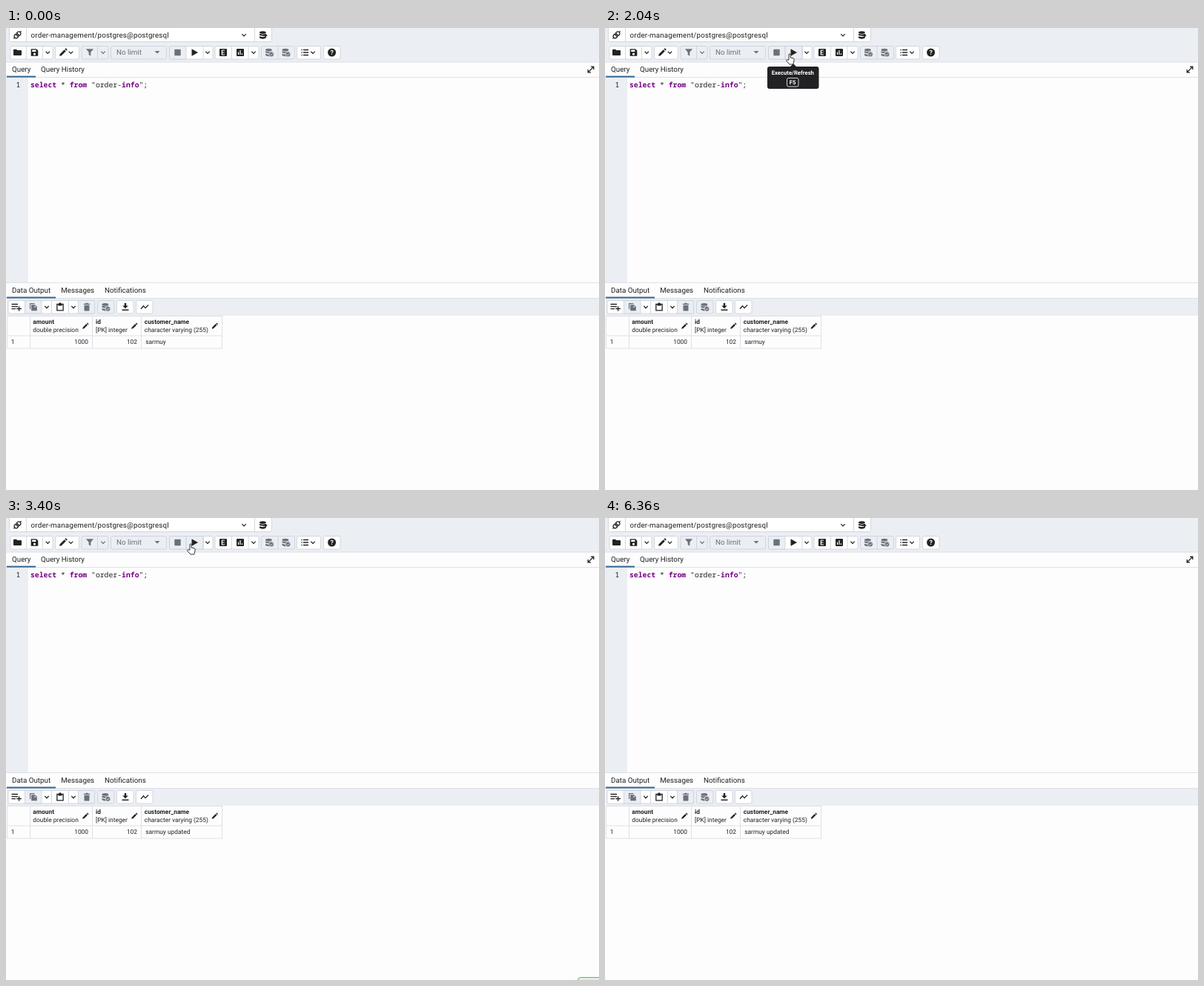
Animation, 800 px wide and 623 px high, one loop 7.2 s. Source, as an HTML page:

```html
<!DOCTYPE html>
<html lang="en">
<head>
<meta charset="utf-8">
<title>Query tool</title>
<style>
  html, body { margin: 0; width: 100%; height: 100%; overflow: hidden; background: #fefdfe; }
  svg { display: block; width: 800px; height: 623px; }
  text { font: 9.8px Roboto, "Open Sans", sans-serif; fill: #222; text-rendering: geometricPrecision; white-space: pre; }
  .small, .small text { font-size: 8.4px; }
  .bold { font-weight: 700; }
  .end { text-anchor: middle; text-anchor: end; }
  .code { font: 9.77px "Noto Sans Mono", "DejaVu Sans Mono", monospace; }
  .key { fill: #770088; font-weight: 700; }
  .tip text { font-size: 7.7px; font-weight: 600; fill: #fff; }
  .wait { font-size: 11.05px; font-weight: 500; fill: #fff; }
  .bar { fill: #ebeef3; }
  .line { fill: #dde0e6; }
  .active { fill: #326690; }
  .box { fill: #fff; stroke: #c9cfd9; stroke-width: .8; }
  .off { fill: #ebeef3; }
  .grid { fill: none; stroke: #dde0e6; }
  .ico { fill: #222; color: #222; }
  .dim, .dim use { fill: #6c7079; color: #6c7079; }
  .stroke { fill: none; stroke: currentColor; stroke-width: 1.3; }
  .pointer path { fill: #fff; stroke: #111; stroke-width: .85; stroke-linejoin: round; }
  .pointer .beam { fill: none; stroke-width: 1; }

  .pointer { animation: travel 7.2s linear infinite; }
  .arrow, .hand, .beam, .hover, .busy, .toast, .before, .after { opacity: 0; animation: 7.2s step-end infinite; }
  .arrow { animation-name: arrow; }
  .hand { animation-name: hand; }
  .beam { animation-name: beam; }
  .hover { animation-name: hover; }
  .busy { animation-name: busy; }
  .toast { animation-name: toast; }
  .before { animation-name: before; }
  .after { animation-name: after; }
  .tip { opacity: 0; animation: tip 7.2s linear infinite; }

  @keyframes travel {
    0%, .55% { transform: translate(309px, 608px); }
    3.33% { transform: translate(304px, 500px); }
    6.11% { transform: translate(278px, 230px); }
    8.33% { transform: translate(254px, 80px); }
    10.55%, 55% { transform: translate(248px, 35px); }
    57.22% { transform: translate(245px, 90px); }
    59.44% { transform: translate(228px, 300px); }
    61.11% { transform: translate(216px, 420px); }
    62.22%, 64.44% { transform: translate(213px, 439px); }
    65% { transform: translate(213px, 439px); }
    67.77%, 69.44% { transform: translate(247px, 420px); }
    71.66%, 75.55% { transform: translate(227px, 420.5px); }
    78.3% { transform: translate(243px, 490px); }
    81.11%, 100% { transform: translate(258px, 624px); }
  }
  @keyframes arrow {
    0% { opacity: 0; }
    .55% { opacity: 1; }
    4.94% { opacity: 0; }
    8.97% { opacity: 1; }
    10.2% { opacity: 0; }
    44.99% { opacity: 1; }
    47.21% { opacity: 0; }
    55.9% { opacity: 1; }
    56.5% { opacity: 0; }
    60.04% { opacity: 1; }
    81.1%, 100% { opacity: 0; }
  }
  @keyframes hand {
    0% { opacity: 0; }
    10.2% { opacity: 1; }
    44.99% { opacity: 0; }
    47.21% { opacity: 1; }
    55.9%, 100% { opacity: 0; }
  }
  @keyframes beam {
    0% { opacity: 0; }
    4.94% { opacity: 1; }
    8.97% { opacity: 0; }
    56.5% { opacity: 1; }
    60.04%, 100% { opacity: 0; }
  }
  @keyframes hover {
    0% { opacity: 0; }
    10.2% { opacity: 1; }
    55.9%, 100% { opacity: 0; }
  }
  @keyframes tip {
    0%, 16.66% { opacity: 0; }
    18.88%, 45.54% { opacity: 1; }
    45.55%, 100% { opacity: 0; }
  }
  @keyframes busy {
    0% { opacity: 0; }
    45.55% { opacity: 1; }
    47.21%, 100% { opacity: 0; }
  }
  @keyframes before { 0% { opacity: 1; } 47.21%, 100% { opacity: 0; } }
  @keyframes after { 0% { opacity: 0; } 47.21%, 100% { opacity: 1; } }
  @keyframes toast { 0% { opacity: 0; } 47.21% { opacity: 1; } 88.33%, 100% { opacity: 0; } }
</style>
</head>
<body>
<svg viewBox="0 0 800 623">
  <defs>
    <path id="caret" class="stroke" d="M-2.7-1.4L0 1.4 2.7-1.4"/>
    <path id="folder" d="M-5.5-3.2q0-1 1-1h3l1.3 1.3h4.7q1 0 1 1v5q0 1-1 1h-9q-1 0-1-1z"/>
    <path id="save" fill-rule="evenodd" d="M-4.8-4.8h7.4l2.2 2.2v7.4h-9.6zM-3.3-3.4h5.2v2.4h-5.2zM0 .6a1.6 1.6 0 1 0 .01 0z"/>
    <path id="pencil" d="M-4.8 4.8l.5-2.6L1.7-3.8 3.8-1.7-2.2 4.3zM2.4-4.5l.9-.9q.5-.4 1 0l1.1 1.1q.4.5 0 1l-.9.9z"/>
    <path id="filter" d="M-5-4.8h10L1.3-.2v5L-1.3 3v-3.2z"/>
    <path id="stop" d="M-4.2-3.4q0-.8.8-.8h6.8q.8 0 .8.8v6.8q0 .8-.8.8h-6.8q-.8 0-.8-.8z"/>
    <path id="play" d="M-4-4.8L4.6 0-4 4.8z"/>
    <g id="explain">
      <rect x="-5" y="-5" width="10" height="10" rx="1"/>
      <path d="M2-3h-3.6v6H2M-1.6 0H1.6" fill="none" stroke="#fff" stroke-width="1.2"/>
    </g>
    <g id="chart">
      <rect x="-5" y="-5" width="10" height="10" rx="1"/>
      <path d="M-2.5 3v-3.5M0 3v-6M2.5 3v-1.8" stroke="#fff" stroke-width="1.2"/>
    </g>
    <g id="db">
      <ellipse cx="-.6" cy="-3.4" rx="4.4" ry="1.8"/>
      <path d="M-5-2c1.5 1.5 7.3 1.5 8.8 0v2.1c-1.5 1.5-7.3 1.5-8.8 0zM-5 1.4c1.5 1.5 7.3 1.5 8.8 0v2.4c-1.5 1.8-7.3 1.8-8.8 0z"/>
    </g>
    <g id="dbmark">
      <use href="#db"/>
      <circle cx="3" cy="2.5" r="3.4" stroke="#ebeef3" stroke-width=".8"/>
      <path d="M1.5 2.5l1.1 1.2 2-2.2" fill="none" stroke="#ebeef3" stroke-width=".9"/>
    </g>
    <path id="list" class="stroke" d="M-2.5-3.5h7M-2.5 0h7M-2.5 3.5h7M-5-3.5h1.3M-5 0h1.3M-5 3.5h1.3"/>
    <path id="copy" fill-rule="evenodd" d="M-5-5h6.5v1.2h-5.3v6.8h-1.2zM-2.8-2.8h4.8l2.8 2.6v5.4h-7.6zM1.3-1.8v2.4h2.5z"/>
    <path id="paste" fill-rule="evenodd" d="M-4.8-4.2h3q.2-1.5 1.8-1.5t1.8 1.5h3v9.7h-9.6zM-3.5-2.8v7h7v-7h-1v1.4h-5v-1.4z"/>
    <path id="trash" d="M-4.2-4.6h2.4l.6-.9h2.4l.6.9h2.4v1.3h-8.4zM-3.5-2.5h7v6.6q0 1.2-1.2 1.2h-4.6q-1.2 0-1.2-1.2z"/>
    <path id="download" d="M-1.2-5h2.4v3.5h2.6L0 2.3-3.8-1.5h2.6zM-4.5 3.5h9v1.4h-9z"/>
    <path id="trend" class="stroke" d="M-5 2.5l3.5-4 2.6 2.8L5-2.8"/>
    <path id="addrow" class="stroke" d="M-6.5-3.5h8.5M-6.5-.4h8.5M-6.5 2.7h5.5M3.6-.8v6.6M.3 2.5h6.6"/>
  </defs>

  <rect width="800" height="623" fill="#fefdfe"/>

  <!-- connection bar and toolbar -->
  <rect class="bar" width="800" height="46"/>
  <rect class="line" y="45.5" width="800" height="1"/>
  <g class="box">
    <path d="M4.5-1H358.5V16.5q0 2-2 2H6.5q-2 0-2-2zM27.5-1V18.5M335.5-1V18.5"/>
    <path d="M8 24.5H61q2 0 2 2V40q0 2-2 2H8q-2 0-2-2V26.5q0-2 2-2zM27.5 24.5V42M49.5 24.5V42"/>
    <rect x="66.5" y="24.5" width="32" height="17.5" rx="2"/>
    <rect class="off" x="102" y="24.5" width="36" height="17.5" rx="2"/>
    <path d="M123.5 24.5V42"/>
    <rect class="off" x="141.5" y="24.5" width="75" height="17.5" rx="2"/>
    <rect x="220.5" y="24.5" width="58.5" height="17.5" rx="2"/>
    <rect class="off" x="220.5" y="24.5" width="22.5" height="17.5" rx="2"/>
    <path class="hover off" d="M243 24.5H266V42H243z"/>
    <path d="M266 24.5V42" />
    <rect x="282" y="24.5" width="59" height="17.5" rx="2"/>
    <path d="M304.5 24.5V42M327 24.5V42"/>
    <rect class="off" x="344.5" y="24.5" width="45" height="17.5" rx="2"/>
    <path d="M367 24.5V42"/>
    <rect x="392.5" y="24.5" width="32" height="17.5" rx="2"/>
    <rect x="428.5" y="24.5" width="22.5" height="17.5" rx="2"/>
  </g>
  <g class="ico">
    <g transform="translate(15.5 9.3) rotate(-45)" class="stroke">
      <path d="M-1-2.6h-1.6a2.6 2.6 0 0 0 0 5.2H-1zM1-2.6h1.6a2.6 2.6 0 0 1 0 5.2H1zM-5.2 0h-2M5.2 0h2M-1-1.2h2M-1 1.2h2"/>
    </g>
    <use href="#caret" x="321" y="9.5"/>
    <use href="#db" x="347" y="9.5"/>
    <path d="M347 10h4.5M349.5 8l2.2 2-2.2 2" class="stroke"/>
    <use href="#folder" x="15.5" y="33"/>
    <use href="#save" x="38.5" y="33"/>
    <use href="#caret" x="56.3" y="33"/>
    <use href="#pencil" x="77" y="33"/>
    <use href="#caret" x="87.5" y="33"/>
    <use href="#play" x="254.5" y="33"/>
    <use href="#caret" x="272" y="33"/>
    <use href="#explain" x="293" y="33"/>
    <use href="#chart" x="316" y="33"/>
    <use href="#caret" x="334" y="33"/>
    <use href="#list" x="403.5" y="33"/>
    <use href="#caret" x="414" y="33"/>
    <circle cx="439.6" cy="33" r="5.5"/>
  </g>
  <text x="437.4" y="36.2" style="font-size:8.8px;font-weight:700;fill:#fff">?</text>
  <g class="dim">
    <use href="#filter" x="113" y="33"/>
    <use href="#caret" x="131" y="33"/>
    <path d="M200.5 31h7l-3.5 3.6z"/>
    <use href="#stop" x="231.5" y="33"/>
    <use href="#dbmark" x="355" y="33"/>
    <use href="#dbmark" x="377.5" y="33"/>
  </g>
  <text x="33.6" y="12.8" letter-spacing=".15">order-management/postgres@postgresql</text>
  <text x="149" y="36.3" style="fill:#6c7079">No limit</text>

  <!-- query editor -->
  <rect class="line" y="66" width="800" height="1"/>
  <rect class="active" x="1" y="64.6" width="39" height="2"/>
  <text x="8" y="58.8">Query</text>
  <text x="47" y="58.8">Query History</text>
  <path d="M785.5 59.5l7-7M789 52.2h3.8V56M785.2 56v3.8h3.8" class="stroke" color="#222"/>
  <rect class="bar" y="67" width="30" height="276"/>
  <text class="code" x="13.5" y="80">1</text>
  <text class="code" x="33" y="80"><tspan class="key">select</tspan> * <tspan class="key">from</tspan> "order-<tspan class="key">info</tspan>";</text>

  <!-- output panel -->
  <rect class="line" y="343" width="800" height="1"/>
  <rect class="line" y="364" width="800" height="1"/>
  <rect class="active" x="1" y="362.5" width="66" height="2"/>
  <text x="8" y="356.8">Data Output</text>
  <text x="74.2" y="356.8">Messages</text>
  <text x="133" y="356.8">Notifications</text>
  <rect class="bar" x="1" y="365" width="799" height="23"/>
  <g class="box">
    <rect x="3" y="367.5" width="116.5" height="17.5" rx="2"/>
    <path class="off" d="M25.5 367.5H48V385H25.5zM97.5 367.5H119.5V385H97.5z"/>
    <path d="M61.5 367.5V385M84.5 367.5V385"/>
    <rect class="off" x="123.5" y="367.5" width="22.5" height="17.5" rx="2"/>
    <rect x="149.5" y="367.5" width="22.5" height="17.5" rx="2"/>
    <rect x="175.5" y="367.5" width="22.5" height="17.5" rx="2"/>
  </g>
  <g class="ico">
    <use href="#addrow" x="14" y="376"/>
    <use href="#caret" x="55" y="376.3"/>
    <use href="#paste" x="73" y="376"/>
    <use href="#caret" x="91" y="376.3"/>
    <use href="#download" x="161" y="376"/>
    <use href="#trend" x="187" y="376.3"/>
  </g>
  <g class="dim">
    <use href="#copy" x="37" y="376"/>
    <use href="#trash" x="109" y="376.3"/>
    <use href="#dbmark" x="134.5" y="376.3"/>
  </g>
  <path class="grid" d="M1.5 388V432.5M32.5 388V432.5M116.5 388V432.5M182.5 388V432.5M291.5 388V432.5M1 388.5H292M1 415H292M1 432H292"/>
  <g class="small">
    <text class="bold" x="36.3" y="399">amount</text>
    <text x="36.3" y="409.7">double precision</text>
    <text class="bold" x="121" y="399">id</text>
    <text x="121" y="409.7">[PK] integer</text>
    <text class="bold" x="186.8" y="399">customer_name</text>
    <text x="186.8" y="409.7">character varying (255)</text>
    <text x="6.8" y="426.3">1</text>
    <text class="end" x="111" y="426.3">1000</text>
    <text class="end" x="177" y="426.3">102</text>
    <text class="before" x="188.2" y="426.3">sarmuy</text>
    <text class="after" x="188.2" y="426.3">sarmuy updated</text>
  </g>
  <g class="ico">
    <use href="#pencil" transform="translate(107 402) scale(.78)"/>
    <use href="#pencil" transform="translate(173 402) scale(.78)"/>
    <use href="#pencil" transform="translate(281.5 402) scale(.78)"/>
  </g>

  <!-- running state -->
  <g class="busy">
    <g class="box">
      <rect x="220.5" y="24.5" width="22.5" height="17.5" rx="2"/>
      <path class="off" d="M243 24.5H266V42H243z"/>
      <path class="off" d="M284 24.5H327V42H284q-2 0-2-2V26.5q0-2 2-2zM304.5 24.5V42"/>
    </g>
    <use class="ico" href="#stop" x="231.5" y="33"/>
    <g class="dim">
      <use href="#play" x="254.5" y="33"/>
      <use href="#explain" x="293" y="33"/>
      <use href="#chart" x="316" y="33"/>
    </g>
    <rect x="1" y="365" width="799" height="258" fill="#000" opacity=".65"/>
    <rect x="475.5" y="504" width="1.7" height="1.7" fill="#ddd"/>
    <text class="wait" x="483" y="506">Waiting for the query to complete...</text>
  </g>

  <rect class="toast" x="771.5" y="619.5" width="60" height="30" rx="4" fill="#dff0de" stroke="#5fb760"/>

  <g class="tip">
    <path d="M249.5 52.5L254 48l4.5 4.5z" fill="#212023"/>
    <rect x="219" y="52" width="69.5" height="30" rx="3" fill="#212023"/>
    <text x="224.7" y="63">Execute/Refresh</text>
    <rect x="245.5" y="67.5" width="15.5" height="11.5" rx="2" fill="none" stroke="#fff" stroke-width=".8"/>
    <text x="248.8" y="76">F5</text>
  </g>

  <g class="pointer">
    <path class="arrow" d="M0 0V11.3L2.6 9 4.3 12.9 6.1 12.1 4.4 8.3H7.9z"/>
    <path class="hand" d="M0 8V1a1.1 1.1 0 0 1 2.2 0V5l3.8.8q1.4.4 1.2 1.9L6.6 11l-.9 3H.8L-3.2 9.4c-.8-1.2.6-2.1 1.5-1.3z"/>
    <path class="beam" d="M-2-5.5h1.5l.5.5.5-.5H2M0-5V5M-2 5.5h1.5L0 5l.5.5H2"/>
  </g>
</svg>
</body>
</html>
```
